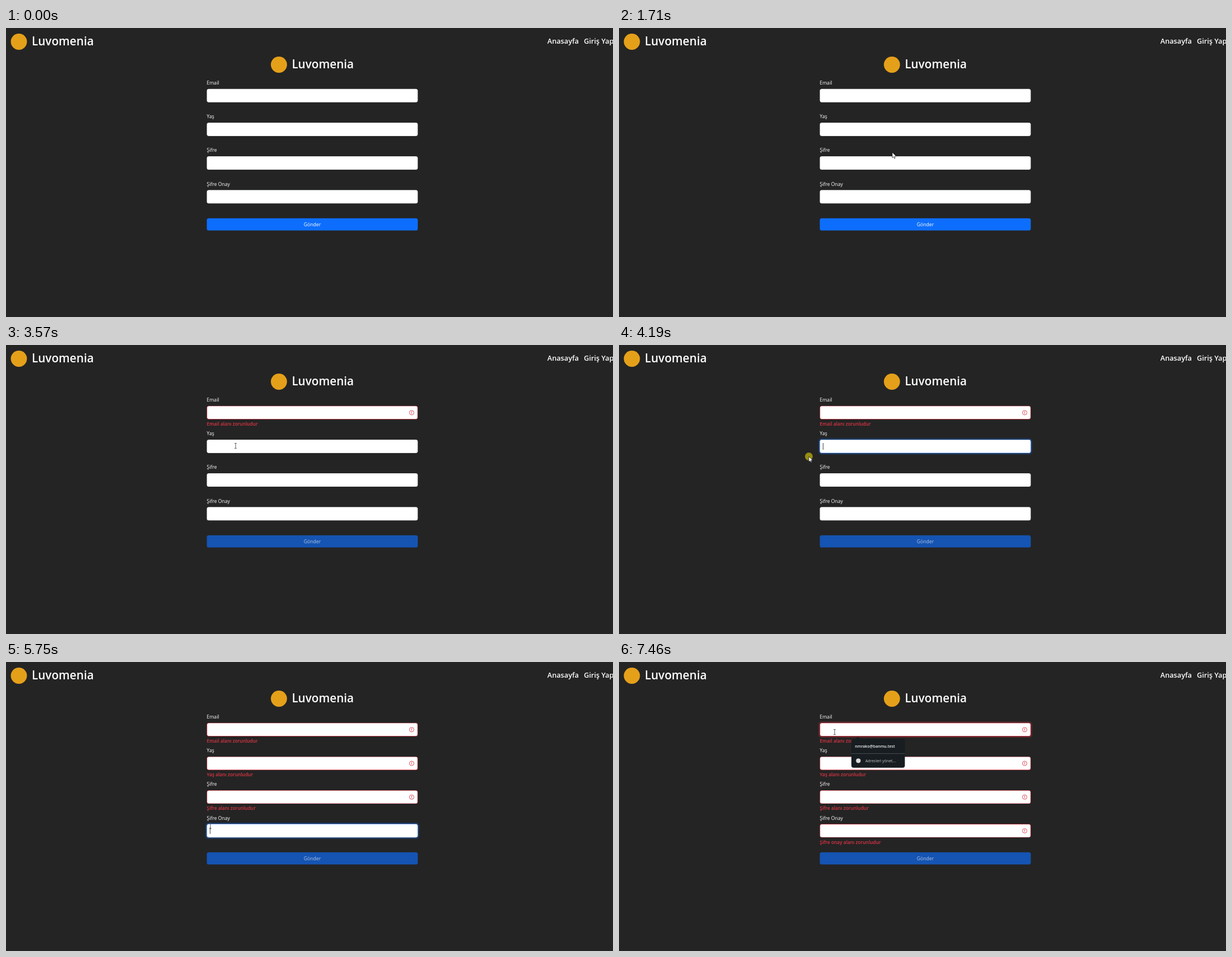
Animation, 1084 px wide and 516 px high, one loop 7.99 s. Source, as an HTML page with a canvas:

```html
<!DOCTYPE html>
<html lang="tr">
<head>
<meta charset="utf-8">
<title>Luvomenia</title>
<style>
  html, body { margin: 0; width: 100%; height: 100%; overflow: hidden; background: #242424; }
  canvas { display: block; }
</style>
</head>
<body>
<canvas id="stage" width="1084" height="516"></canvas>
<script>
const ctx = document.getElementById('stage').getContext('2d');
const LOOP = 7990, START = 310, STEP = 70;
const FADE = 150, TRAVEL = 560, BLUR_LAG = 60;
const FONT = '"Open Sans", "Noto Sans", sans-serif';
const RED = '#dc3545', DARK = '#171d20', WHITE = '#fff';
const BRAND = 'Luvomenia';

const BOX = { x: 358.6, w: 376.8, h: 24 };
const BUTTON = { x: BOX.x, y: 339.7, w: BOX.w, h: 21.8 };
const POPUP = { x: 415, y: 137.3, w: 95.5, h: 51.5 };
const FIELDS = ['Email', 'Yaş', 'Şifre', 'Şifre Onay'].map((label, i) => ({
  ...BOX, label, y: 108.7 + 60.2 * i,
  error: label.replace('Onay', 'onay') + ' alanı zorunludur'
}));

const clamp = v => Math.max(0, Math.min(1, v));
const ease = u => u * u * (3 - 2 * u);
const inside = (r, p) => p.x > r.x && p.x < r.x + r.w && p.y > r.y && p.y < r.y + r.h;

// The pointer's tour: plain waypoints and mouse clicks
const move = (t, x, y) => ({ t, x, y });
const click = (t, x, y) => ({ t, x, y, pressed: true });
const STOPS = [
  move(START, 714, 8), move(1080, 408, 207), move(1400, 450, 358), move(1710, 488, 222),
  click(2400, 426, 121), click(2880, 418.5, 80),
  click(3840, 410, 180), click(4180, 339, 199), move(4420, 402, 300),
  click(4720, 411.5, 250), click(5150, 327, 269),
  click(5500, 380, 300), move(5700, 365, 293), click(5950, 331, 289),
  move(6180, 337, 284), click(6900, 385, 125)
];
const CLICKS = STOPS.filter(s => s.pressed);

// A click in a field focuses it until the next click lands elsewhere
const VISITS = CLICKS.map((c, i) => ({
  field: FIELDS.find(f => inside(f, c)),
  from: c.t,
  to: i + 1 < CLICKS.length ? CLICKS[i + 1].t + BLUR_LAG : LOOP
})).filter(v => v.field);
FIELDS.forEach(f => {
  f.visits = VISITS.filter(v => v.field === f);
  f.invalidAt = f.visits[0].to;
});

function pointerAt(t) {
  if (t < START) return null;
  const i = STOPS.findIndex(s => s.t > t);
  if (i < 0) return STOPS[STOPS.length - 1];
  const a = STOPS[i - 1], b = STOPS[i];
  const leave = a.pressed ? a.t + 80 : a.t;
  const arrive = b.pressed ? Math.min(leave + TRAVEL, b.t - 60) : b.t;
  const e = ease(clamp((t - leave) / (arrive - leave)));
  return { x: a.x + (b.x - a.x) * e, y: a.y + (b.y - a.y) * e };
}

function text(str, x, y, size, color = WHITE, weight = 400, align = 'left') {
  ctx.font = `${weight} ${size}px ${FONT}`;
  ctx.fillStyle = color;
  ctx.textAlign = align;
  ctx.fillText(str, x, y);
}

function disc(x, y, r, color) {
  ctx.fillStyle = color;
  ctx.beginPath();
  ctx.arc(x, y, r, 0, Math.PI * 2);
  ctx.fill();
}

function panel({ x, y, w, h }, grow, r, color) {
  ctx.beginPath();
  ctx.roundRect(x - grow, y - grow, w + 2 * grow, h + 2 * grow, r);
  ctx.fillStyle = color;
  ctx.fill();
}

function brand(x, y) {
  disc(x, y, 14.4, '#e5a01a');
  text(BRAND, x + 23, y + 6.7, 20.7, WHITE, 600);
}

function warning(x, y) {
  ctx.strokeStyle = ctx.fillStyle = RED;
  ctx.lineWidth = 0.9;
  ctx.beginPath();
  ctx.arc(x, y, 4, 0, Math.PI * 2);
  ctx.stroke();
  ctx.fillRect(x - 0.5, y - 2.3, 1, 2.8);
  ctx.fillRect(x - 0.5, y + 1.2, 1, 1);
}

function glowAt(f, t) {
  return Math.max(...f.visits.map(v =>
    Math.min(clamp((t - v.from) / FADE), 1 - clamp((t - v.to) / FADE))));
}

function drawField(f, t) {
  const invalid = t >= f.invalidAt, glow = glowAt(f, t);
  text(f.label, f.x, f.y - 7.8, 8.6);
  panel(f, 2.5, 5.5, `rgba(${invalid ? '220,53,69' : '13,110,253'},${0.27 * glow})`);
  panel(f, 0, 3.6, invalid ? RED : '#dee2e6');
  if (!invalid) panel(f, 0, 3.6, `rgba(134,183,254,${glow})`);
  panel(f, -0.65, 3, WHITE);
  if (invalid) {
    warning(724.5, f.y + 12.1);
    text(f.error, f.x, f.y + 35.3, 8.35, RED, 600);
  }
  const visit = f.visits.find(v => t >= v.from && t < v.to);
  if (visit && (t - visit.from) % 1000 < 500) {
    ctx.fillStyle = '#444';
    ctx.fillRect(364, Math.round(f.y + 6), 1, 12);
  }
}

function drawButton(t, pointer) {
  const hover = pointer && inside(BUTTON, pointer);
  ctx.globalAlpha = 1 - 0.35 * clamp((t - FIELDS[0].invalidAt) / FADE);
  panel(BUTTON, 0, 3.6, hover ? '#0b5ed7' : '#0d6efd');
  text('Gönder', BOX.x + BOX.w / 2, BUTTON.y + 14.3, 8.6, WHITE, 400, 'center');
  ctx.globalAlpha = 1;
}

function drawPopup() {
  const { x, y, w } = POPUP, tip = x + 11.5;
  ctx.beginPath();
  ctx.moveTo(tip - 4.5, y + 0.5);
  ctx.lineTo(tip, y - 3.8);
  ctx.lineTo(tip + 4.5, y + 0.5);
  ctx.fillStyle = DARK;
  ctx.fill();
  panel(POPUP, 0, 4, DARK);
  ctx.fillStyle = '#454b4e';
  ctx.fillRect(x, 163, w, 1);
  text('nmrako@banmu.test', x + 6.3, 153.2, 7, '#f2f2f2', 600);
  disc(x + 12.4, 176.3, 4.1, '#dcdcdc');
  text('Adresleri yönet...', x + 25, 179, 6.9, '#c4c7c9');
}

function arrow({ x, y }) {
  ctx.save();
  ctx.translate(x, y);
  const shape = new Path2D('M0 0V9.8L2.3 7.8L3.8 11L5.3 10.3L3.9 7.2L6.9 7Z');
  ctx.fillStyle = WHITE;
  ctx.fill(shape);
  ctx.strokeStyle = '#111';
  ctx.lineWidth = 0.7;
  ctx.stroke(shape);
  ctx.restore();
}

function beam({ x, y }) {
  ctx.fillStyle = '#444';
  ctx.fillRect(x - 0.4, y - 4.5, 0.9, 9);
  for (const dy of [-4.8, 4]) ctx.fillRect(x - 2, y + dy, 4, 0.8);
}

function drawPointer(t, p, popup) {
  if (CLICKS.some(c => t >= c.t - 60 && t < c.t + 100)) {
    disc(p.x, p.y, 6.9, 'rgba(255,238,0,.52)');
  }
  const overField = FIELDS.some(f => inside(f, p)) && !(popup && inside(POPUP, p));
  (overField ? beam : arrow)(p);
}

function draw(t) {
  const pointer = pointerAt(t);
  const popup = FIELDS[0].visits.some(v => t >= v.from + 60 && t < v.to);
  ctx.fillStyle = '#242424';
  ctx.fillRect(0, 0, 1084, 516);
  brand(23, 24.5);
  brand(487.4, 65.5);
  text('Anasayfa', 966.8, 28, 12.7, WHITE, 600);
  text('Giriş Yap', 1032, 28, 12.7, WHITE, 600);
  FIELDS.forEach(f => drawField(f, t));
  drawButton(t, pointer);
  if (popup) drawPopup();
  if (pointer) drawPointer(t, pointer, popup);
}

const began = performance.now();
function loop() {
  const t = (performance.now() - began) % LOOP;
  draw(START + Math.floor((t - START) / STEP) * STEP);
  requestAnimationFrame(loop);
}
loop();
</script>
</body>
</html>
```
